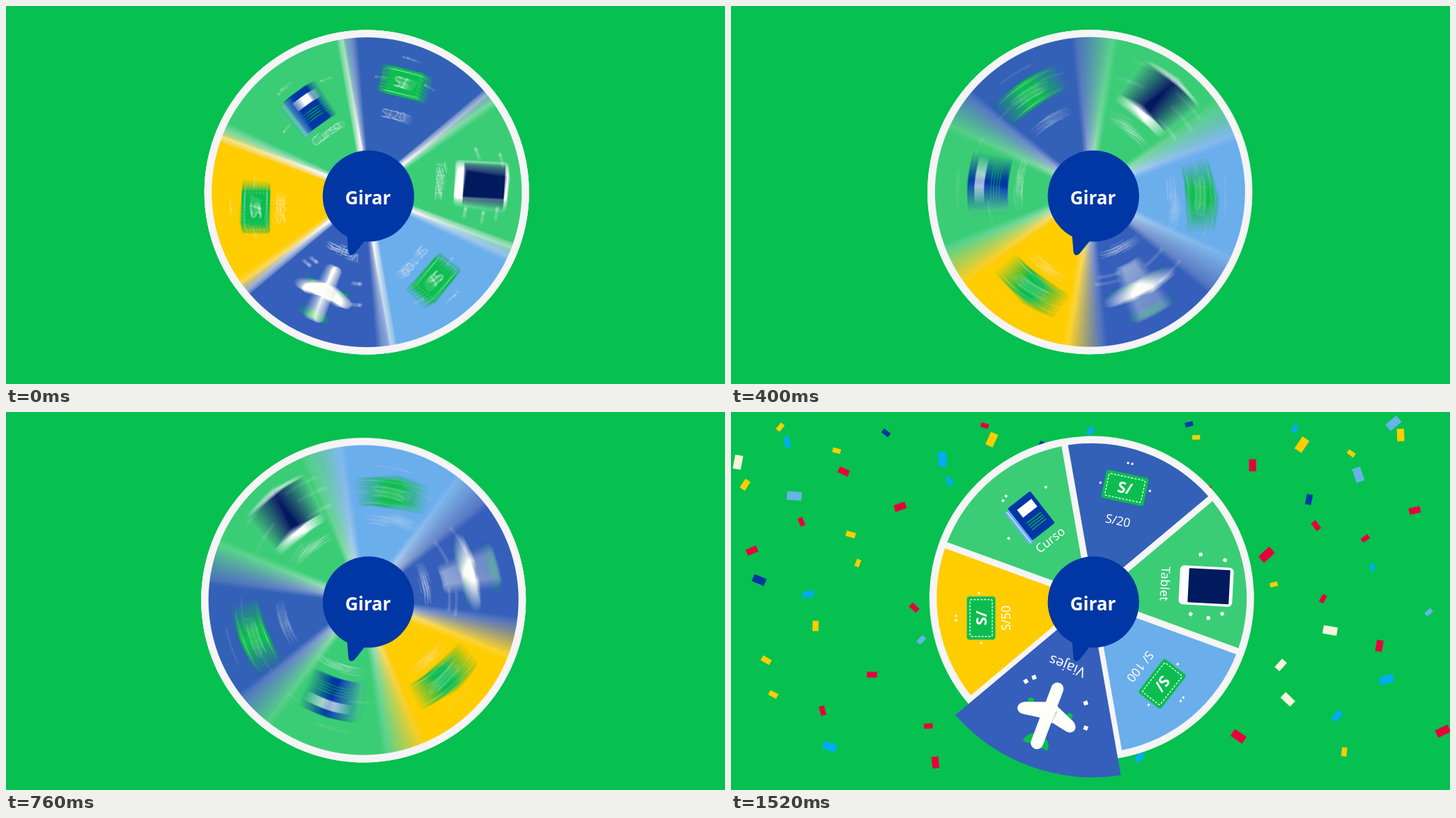
Recreate the animation shown at these times as an HTML page. Size 1032 by 543 pixels, loop 3.16 s.

```html
<!DOCTYPE html>
<html lang="es">
<head>
<meta charset="utf-8">
<title>Ruleta</title>
<style>
  html, body { margin: 0; width: 100%; height: 100%; overflow: hidden; background: #06c050; }
  svg { display: block; width: 100%; height: 100%; }
  text { font-family: "Noto Sans", "Open Sans", sans-serif; fill: #fff; text-anchor: middle; }
</style>
</head>
<body>
<svg viewBox="0 0 1032 543">
  <defs><g id="wheel"></g></defs>
  <rect width="1032" height="543" fill="#06c050"/>
  <g id="confetti"></g>
  <g id="blur"></g>
  <g fill="#0037a5">
    <circle cx="520.2" cy="273" r="65.6"/>
    <path d="M489 322 L491.500 353 Q493 361 500 356 L517 335 Z"/>
  </g>
  <text x="519.500" y="284.500" font-size="26" font-weight="600">Girar</text>
</svg>
<script>
const LOOP = 3160, STEP = 40;
const SPIN = { end: 920, ramp: 6, turns: 2, pivot: '516.1 270' };
const SHUTTER = 20, SAMPLES = 18;
const CX = 517.7, CY = 267.5, RIM = 233, R = 222.5, GAP = 4.7;
const POP = { x: 508, y: 296, grow: 0.18, from: 940, to: 1080 };
const FADE = { from: 1280, to: 1520 };
const GREEN = '#0bbd4f', NAVY = '#0037a5', WHITE = '#f5f5f5';

const $ = id => document.getElementById(id);
const clamp = v => Math.min(1, Math.max(0, v));
const span = (t, { from, to }) => clamp((t - from) / (to - from));
const rad = deg => deg * Math.PI / 180;

// Markup helpers
const polar = (r, deg) => [r * Math.cos(rad(deg)), r * Math.sin(rad(deg))];
const onWheel = (r, deg) => polar(r, deg).map((v, i) => (v + [CX, CY][i]).toFixed(2)).join(' ');
const at = (x, y, a, body) => `<g transform="translate(${x} ${y}) rotate(${a})">${body}</g>`;
const rect = (x, y, w, h, fill, r = 0, extra = '') =>
  `<rect x="${x}" y="${y}" width="${w}" height="${h}" rx="${r}" fill="${fill}" ${extra}/>`;
const box = (w, h, fill, r, extra) => rect(-w / 2, -h / 2, w, h, fill, r, extra);
const label = (y, size, str, weight = 400) =>
  `<text y="${y}" dy=".36em" font-size="${size}" font-weight="${weight}">${str}</text>`;
const sparkle = (r, size, ...angles) =>
  angles.map(a => at(...polar(r, a), a, box(size, size, '#fff'))).join('');
const mirror = body => body + `<g transform="scale(-1 1)">${body}</g>`;
const zoom = k => `translate(${POP.x} ${POP.y}) scale(${k}) translate(${-POP.x} ${-POP.y})`;

// Icons, each centred on 0,0 with the label below
const bill = () =>
  box(62, 41, GREEN, 4) +
  box(53, 32, 'none', 2, 'stroke="#fff" stroke-width="1.3" stroke-dasharray="3 2"') +
  label(0, 22, 'S/', 700) + sparkle(36, 3, 180, -95, -85, -5);

const tablet = () =>
  box(56, 77, '#fff', 6) + rect(-24.5, -33.5, 49, 59, '#001a5e', 1) +
  sparkle(46, 5, 167, 213, 26, -7, -33);

function book() {
  let lines = '';
  for (let y = 4; y < 18; y += 4) lines += rect(-12, y, 26, 1.2, GREEN);
  return rect(-28, -26, 9, 57, '#6baeec') + rect(-25, -26, 1.2, 57, '#d9ebfb') +
    box(41, 58, NAVY, 2) + rect(-11, -19, 26, 14, '#fff') + lines +
    sparkle(46, 3.5, 246, 256, -25, 173);
}

const plane = () =>
  mirror(`<g fill="${GREEN}"><path d="M4 -29 Q19 -33 19 -47 L4 -46 Z"/><circle cx="30" cy="11" r="4.500"/></g>`) +
  mirror('<path fill="#fffff8" d="M0 21 L38 6 Q46 1 44 -6 Q41 -12 33 -11 L0 -5 Z"/>') +
  '<path fill="#d5dcf0" d="M-4 13 L-12 10 L-10 -8 L-3 -6 Z"/>' +
  '<path stroke="#fffff8" stroke-width="18" stroke-linecap="round" d="M1 41 L-1 -42"/>' +
  sparkle(58, 6, 49, 36, 140, 176);

// Clockwise from the top
const prizes = [
  { name: 'S/20', fill: '#3361b8', icon: bill, x: 565.5, y: 109, tilt: 12, drop: 48 },
  { name: 'Tablet', fill: '#3acd76', icon: tablet, x: 682, y: 250, tilt: 93, drop: 59 },
  { name: 'S/ 100', fill: '#6baeec', icon: bill, x: 619, y: 390.5, tilt: 128, drop: 40 },
  { name: 'Viajes', fill: '#355fba', icon: plane, x: 454, y: 436, tilt: 202, drop: 76, won: true },
  { name: 'S/50', fill: '#ffcd00', icon: bill, x: 359, y: 296, tilt: -90, drop: 36 },
  { name: 'Curso', fill: '#3acd76', icon: book, x: 431, y: 149, tilt: -38, drop: 44 }
];

function sector(i, fill) {
  const mid = 60 * i - 70, half = 30 - Math.asin(GAP / R) * 180 / Math.PI;
  return `<path fill="${fill}" d="M${onWheel(GAP * 2, mid)} L${onWheel(R, mid - half)}
    A${R} ${R} 0 0 1 ${onWheel(R, mid + half)} Z"/>`;
}

function slice(p, i) {
  const size = p.won ? 20 : 17.5;
  const art = at(p.x, p.y, p.tilt, p.icon() + label(p.drop, size, p.name));
  const back = sector(i, p.fill);
  return p.won
    ? `<g id="prize">${back}<g transform="${zoom(1 / (1 + POP.grow))}">${art}</g></g>`
    : back + art;
}

const slices = won => prizes.map((p, i) => !!p.won === won ? slice(p, i) : '').join('');
const disc = (cy, r) => `<circle cx="${CX}" cy="${cy}" r="${r}" fill="${WHITE}"/>`;
$('wheel').innerHTML = disc(CY, RIM) + slices(false) + disc(273, 59) + slices(true);

// Evenly spread paper, denser towards the top
function confetti(count) {
  const [red, cyan, yellow] = ['#e6003c', '#00aeef', '#ffcd00'];
  const colors = [red, cyan, yellow, '#f5f5dc', red, NAVY, yellow, '#64b4e6', cyan, red];
  let seed = 7, out = '';
  const rnd = () => (seed = seed * 16807 % 2147483647) / 2147483647;
  for (let i = 1; i <= count; i++) {
    const x = 1032 * (i * 0.7549 % 1), y = 16 + 495 * (i * 0.5698 % 1) ** 1.35;
    const w = 11 + 11 * rnd() ** 1.6;
    out += at(x, y, 180 * rnd(), box(w, w * 0.58, colors[Math.floor(rnd() * colors.length)]));
  }
  return out;
}
$('confetti').innerHTML = confetti(88);

// Stacked copies with opacity 1/n average into motion blur
$('blur').innerHTML = Array.from({ length: SAMPLES },
  (_, i) => `<use href="#wheel" opacity="${1 / (i + 1)}"/>`).join('');
const copies = [...$('blur').children];

// Short run-up, then constant speed until a dead stop
function angle(t) {
  const { end, ramp, turns } = SPIN;
  const s = Math.min(t, end);
  const run = s < ramp ? s * s / (2 * ramp) : s - ramp / 2;
  return 360 * turns * run / (end - ramp / 2);
}

function draw(now) {
  const t = Math.floor((now % LOOP) / STEP) * STEP;
  const open = Math.max(0, t - SHUTTER / 2), close = t + SHUTTER / 2;
  copies.forEach((c, i) => {
    c.style.display = i === 0 || open < SPIN.end ? '' : 'none';
    const a = angle(open + (close - open) * (i + 0.5) / SAMPLES);
    c.setAttribute('transform', `rotate(${a.toFixed(3)} ${SPIN.pivot})`);
  });
  const p = span(t, POP);
  $('prize').setAttribute('transform', zoom(1 + POP.grow * p * p * (3 - 2 * p)));
  $('confetti').setAttribute('opacity', span(t, FADE));
}

let start;
function tick(now) {
  start ??= now;
  draw(now - start);
  requestAnimationFrame(tick);
}
draw(0);
requestAnimationFrame(tick);
</script>
</body>
</html>
```
